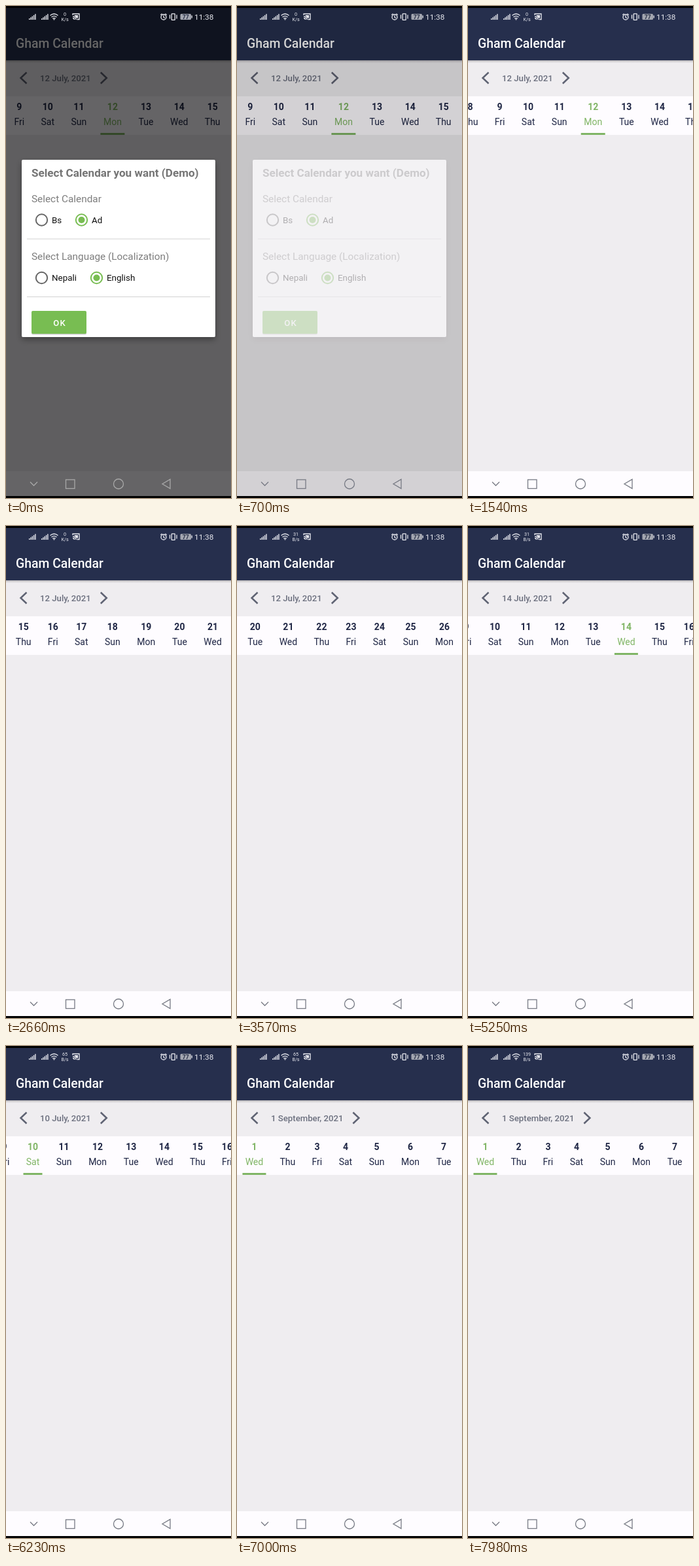
Recreate the animation shown at these times as an HTML page. Size 344 by 752 pixels, loop 8 s.

```html
<!DOCTYPE html>
<html lang="en">
<head>
<meta charset="utf-8">
<title>Calendar demo</title>
<style>
  html, body { margin: 0; width: 100%; height: 100%; overflow: hidden; background: #000; }
  svg { display: block; width: 100vw; height: 100vh; font-family: Roboto, sans-serif; }
  .medium { font-weight: 500; }
  .bold { font-weight: 700; }
  .mid { text-anchor: middle; }
  .line { fill: none; stroke-width: 1.3; }
  .label { font-size: 15.35px; fill: #7d7d7d; }
  .option { font-size: 13.4px; fill: #111; }
  #strip { fill: #1f2645; font-size: 14px; }
  #strip .on { fill: #80b565; }
  .radio { fill: none; stroke: #666; stroke-width: 2; }
  .radio.on { stroke: #78bd52; }
</style>
</head>
<body>
<svg viewBox="0 0 344 752">
  <defs>
    <linearGradient id="fall" x2="0" y2="1">
      <stop stop-color="#000" stop-opacity=".22"/>
      <stop offset="1" stop-color="#000" stop-opacity="0"/>
    </linearGradient>
    <filter id="lift" x="-10%" y="-10%" width="120%" height="125%">
      <feDropShadow dx="0" dy="4" stdDeviation="5" flood-opacity=".35"/>
    </filter>
  </defs>

  <rect width="344" height="752" fill="#efedf0"/>
  <rect y="3" width="344" height="80" fill="#262f4d"/>
  <rect y="83" width="344" height="4" fill="url(#fall)"/>
  <text x="15" y="64" class="medium" font-size="19.4" fill="#fff">Gham Calendar</text>

  <g class="line" stroke="#5f6373" style="stroke-width:2.5">
    <path d="M31.5 101.5 22.5 110 31.5 118.5"/>
    <path id="next" d="M0 101.5 9 110 0 118.5"/>
  </g>
  <text id="date" x="52" y="115" class="medium" font-size="13.2" fill="#6c707f"></text>

  <rect y="138" width="344" height="59" fill="#fefcff"/>
  <g id="strip" class="mid"></g>
  <rect y="711" width="344" height="38" fill="#fefcff"/>

  <g id="modal">
    <rect y="3" width="344" height="746" fill-opacity=".6"/>
    <rect x="24" y="235" width="296" height="271" rx="2" fill="#fff" filter="url(#lift)"/>
    <text x="39" y="261" class="bold" font-size="17.1" fill="#757575">Select Calendar you want (Demo)</text>
    <text x="39" y="300" class="label">Select Calendar</text>
    <text x="39" y="388" class="label">Select Language (Localization)</text>
    <g id="radios"></g>
    <path d="M32 356H312M32 444.5H312" stroke="#d2d2d2"/>
    <rect x="39" y="467.5" width="84" height="35" rx="2.5" opacity=".18"/>
    <rect x="39" y="466" width="84" height="35" rx="2" fill="#78bd52"/>
    <text x="82" y="488.5" class="mid medium" font-size="13" letter-spacing="1.1" fill="#fff">OK</text>
  </g>

  <g id="nav" class="line">
    <path d="M37 727.5 42.5 733 48 727.5"/>
    <rect x="91.5" y="724" width="13.5" height="13.5"/>
    <circle cx="172" cy="730.5" r="7.5"/>
    <path d="M251 723.5V737.5L239 730.5Z"/>
  </g>

  <g id="status" fill="#e9eaf0">
    <g id="signals"></g>
    <g class="line" stroke="#e9eaf0">
      <path d="M67.5 14.5Q73.5 9.5 79.5 14.5M69.5 17Q73.5 13.7 77.5 17M71.3 19.3Q73.5 17.6 75.7 19.3"/>
      <path d="M102 14V12H112V20.5H108.5"/>
      <path d="M102 16A5 5 0 0 1 107 21M102 18.5A2.5 2.5 0 0 1 104.5 21"/>
      <circle cx="241" cy="17" r="4"/>
      <path d="M241 14.5V17.3L243 18.5M236.3 13.7 238.6 11.8M245.7 13.7 243.4 11.8"/>
      <rect x="253.2" y="11.8" width="5" height="9.5" rx=".6"/>
      <path d="M250.5 13.5V19.5M261 13.5V19.5"/>
    </g>
    <path d="M104.5 14H110V18.5H107.5Q106.5 16 104.5 15Z"/>
    <circle cx="73.5" cy="20.6" r="1"/>
    <rect x="266.5" y="12" width="16.5" height="9" rx="1.5" fill="#a3a6b0"/>
    <rect x="283.5" y="14.5" width="1.3" height="4" fill="#e9eaf0"/>
    <text x="274.7" y="19.8" class="mid bold" font-size="8.5" fill="#222a42">77</text>
    <text x="288" y="20.7" font-size="11.8">11:38</text>
    <g class="mid" font-size="7.2">
      <text id="rate" x="90" y="15"></text>
      <text id="unit" x="90" y="23.3"></text>
    </g>
  </g>

  <rect width="344" height="3"/>
  <rect y="749" width="344" height="3"/>
</svg>

<script>
const LOOP = 8000, STEP = 70;
const $ = id => document.getElementById(id);

const weekdays = ['Sun', 'Mon', 'Tue', 'Wed', 'Thu', 'Fri', 'Sat'];
const gaps = [51.5, 51.1, 50.7, 51, 45, 43.5, 47.6];   // centre to the next day's centre
const barWidths = [33, 37, 32, 36, 33, 24, 29];
const months = [
  { name: 'July', days: 31, first: 4 },
  { name: 'August', days: 31, first: 0, x: 25 },
  { name: 'September', days: 30, first: 3, x: 26.4 }
];

// Each row holds from its time until the next one.
const picks = [[0, 0, 12], [4970, 0, 14], [5950, 0, 10], [6580, 1, 1], [7000, 2, 1]];
const rates = [[0, '0', 'K/s'], [3080, '31', 'B/s'], [5670, '65', 'B/s'], [7420, '139', 'B/s']];
const fades = [[0, 1], [630, .65], [700, .28], [770, 0]];

// Time and centre of 9 July while the strip is dragged.
const drag = [
  [1470, 20.3], [1540, 48.6], [1820, 170], [2100, 110], [2380, -110], [2660, -268.7],
  [2940, -330], [3220, -380], [3570, -506.4], [3990, -590], [4060, -590], [4340, -220], [4690, -2.5]
];
const NINTH = 385.4;   // distance from 1 July to 9 July

const current = (rows, t) => rows.filter(row => row[0] <= t).pop();

function slope(i) {
  const a = drag[i - 1], b = drag[i + 1];
  return a && b ? (b[1] - a[1]) / (b[0] - a[0]) : 0;
}

function dragX(t) {
  const i = drag.findIndex(p => p[0] > t);
  if (i === 0) return drag[0][1];
  if (i < 0) return drag[drag.length - 1][1];
  const [t0, x0] = drag[i - 1], [t1, x1] = drag[i], span = t1 - t0;
  const u = (t - t0) / span, v = 1 - u;
  return x0 * v * v * (1 + 2 * u) + x1 * u * u * (3 - 2 * u)
    + span * (slope(i - 1) * u * v * v - slope(i) * u * u * v);
}

function stripMarkup(month, picked, left) {
  let x = left, out = '';
  for (let day = 1; day <= month.days; day++) {
    const w = (month.first + day - 1) % 7;
    if (x > -40 && x < 384) {
      const on = day === picked;
      out += `<g${on ? ' class="on"' : ''} transform="translate(${x.toFixed(2)})">
        <text y="159" class="bold">${day}</text><text y="182">${weekdays[w]}</text>
        ${on ? `<rect x="${-barWidths[w] / 2}" y="194" width="${barWidths[w]}" height="3"/>` : ''}</g>`;
    }
    x += gaps[w];
  }
  return out;
}

function render(t) {
  const [, m, day] = current(picks, t), month = months[m];
  $('strip').innerHTML = stripMarkup(month, day, month.x ?? dragX(t) - NINTH);
  $('date').textContent = `${day} ${month.name}, 2021`;
  $('next').setAttribute('transform', `translate(${52 + $('date').getComputedTextLength() + 15})`);

  const [, rate, unit] = current(rates, t);
  $('rate').textContent = rate;
  $('unit').textContent = unit;

  const alpha = current(fades, t)[1];
  $('modal').setAttribute('opacity', alpha);
  $('nav').setAttribute('stroke', alpha > .5 ? '#a8a8a8' : '#777a84');
}

const radio = (x, y, text, on) =>
  `<circle class="radio${on ? ' on' : ''}" cx="${x}" cy="${y}" r="8.7"/>
   ${on ? `<circle cx="${x}" cy="${y}" r="5" fill="#78bd52"/>` : ''}
   <text class="option" x="${x + 15.5}" y="${y + 4.8}">${text}</text>`;
$('radios').innerHTML = radio(54.5, 327, 'Bs') + radio(115.5, 327, 'Ad', true)
  + radio(54.5, 415.5, 'Nepali') + radio(138.5, 415.5, 'English', true);

$('signals').innerHTML = [35, 54].map(x => [0, 1, 2, 3, 4].map(i =>
  `<rect x="${x + i * 2.3}" y="${19 - i * 1.7}" width="1.4" height="${2 + i * 1.7}"/>`).join('')).join('');

const start = performance.now();
let shown = -1;
function tick() {
  const t = Math.floor((performance.now() - start) % LOOP / STEP) * STEP;
  if (t !== shown) render(shown = t);
  requestAnimationFrame(tick);
}
tick();
</script>
</body>
</html>
```
